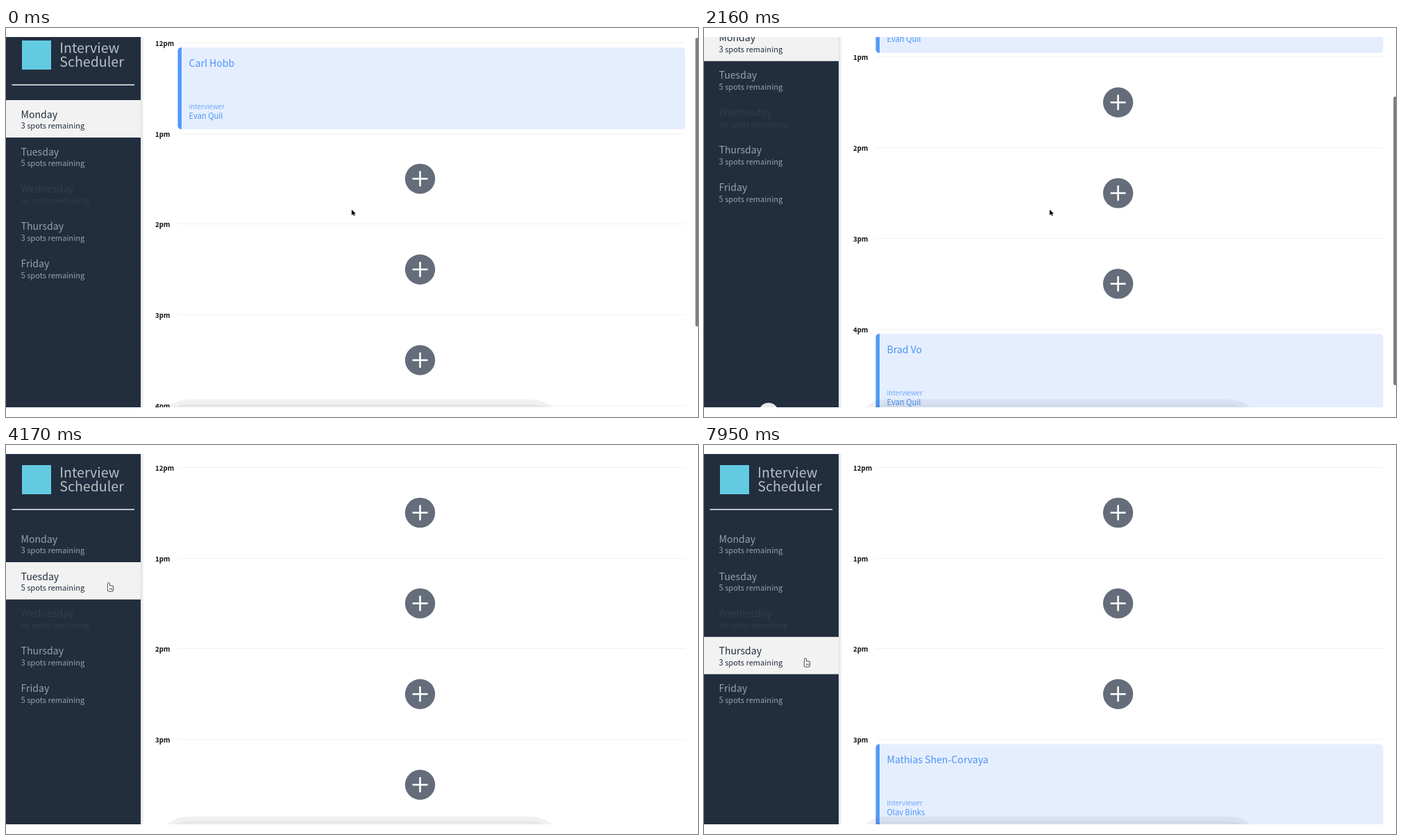
Recreate the animation shown at these times as an HTML page with a canvas. Size 997 by 561 pixels, loop 8000 ms.

```html
<!DOCTYPE html>
<html lang="en">
<head>
<meta charset="utf-8">
<title>Interview Scheduler</title>
<style>
  html, body { margin: 0; width: 100%; height: 100%; overflow: hidden; background: #fff; }
  canvas { display: block; }
</style>
</head>
<body>
<canvas id="stage" width="997" height="561"></canvas>
<script>
const ctx = document.getElementById('stage').getContext('2d');
const LOOP = 8000, STEP = 30;
const TOP = 13, BOTTOM = 547, HEIGHT = BOTTOM - TOP;
const SIDE = 194, DAY_TOP = 115, DAY_H = 53.9;
const HOUR_TOP = 32.2, HOUR_H = 130.8;
const CARD_X = 247.5, CARD_W = 731, CARD_H = 118;
const FAMILY = '"Noto Sans CJK JP", "Noto Sans CJK SC", "Noto Sans CJK", "Open Sans", sans-serif';
const NAVY = '#222e3e', BLUE = '#4c94f5';

const DAYS = [
  { name: 'Monday', spots: '3', slots: { 12: ['Carl Hobb', 'Evan Quil'], 4: ['Brad Vo', 'Evan Quil'] } },
  { name: 'Tuesday', spots: '5', slots: {} },
  { name: 'Wednesday', spots: 'no', full: true, slots: {
    12: ['Kurt Lo', 'Mirabel Tasen'],
    1: ['Ryle Shung', 'Rosalind Petrec'],
    2: ['Noam Barrinez', 'Helen Farnolds'],
    3: ['Nadia Hollar-Benks', 'Keri Dalholm'] } },
  { name: 'Thursday', spots: '3', slots: { 3: ['Mathias Shen-Corvaya', 'Olav Binks'] } },
  { name: 'Friday', spots: '5', slots: {} }
];

const clamp = u => Math.max(0, Math.min(1, u));

function ease(t, from, to) {
  const u = clamp((t - from) / (to - from));
  return u * u * (3 - 2 * u);
}

function box(x, y, w, h, color, radius = 0) {
  ctx.fillStyle = color;
  ctx.beginPath();
  ctx.roundRect(x, y, w, h, radius);
  ctx.fill();
}

function disc(x, y, r, color) {
  box(x - r, y - r, 2 * r, 2 * r, color, r);
}

function text(str, x, y, size, weight, color) {
  ctx.font = `${weight} ${size}px ${FAMILY}`;
  ctx.fillStyle = color;
  ctx.fillText(str, x, y);
}

function dayRow(day, y, on, hover) {
  let color = day.full ? '#323d4c' : '#98a1ac';
  if (on) {
    box(0, y, SIDE, DAY_H, day.full ? '#424c58' : '#f2f2f2');
    color = day.full ? '#28333f' : NAVY;
  } else if (hover) {
    box(0, y, SIDE, DAY_H, day.full ? '#2b3746' : '#3b4654');
  }
  text(day.name, 21.5, y + 25.6, 14.1, 400, color);
  text(`${day.spots} spots remaining`, 21.5, y + 41.2, 11.1, 300, color);
}

function sidebar(scroll, selected, hovered) {
  box(0, TOP, SIDE, HEIGHT, NAVY);
  const edge = ctx.createLinearGradient(SIDE, 0, SIDE + 5, 0);
  edge.addColorStop(0, '#dddfe1');
  edge.addColorStop(1, '#fff');
  box(SIDE, TOP, 5, HEIGHT, edge);

  ctx.save();
  ctx.translate(0, -scroll);
  box(23, 29, 42, 42, '#62cbe2');
  text('Interview', 77.3, 47, 19.6, 300, '#b9bfc6');
  text('Scheduler', 77.3, 66.6, 19.6, 300, '#b9bfc6');
  box(8.5, 92.3, 176.5, 1.5, '#f2f2f2');
  DAYS.forEach((day, i) => dayRow(day, DAY_TOP + DAY_H * i, i === selected, i === hovered));
  disc(93, 675.5, 14, '#e9e9e9');
  ctx.restore();
}

function card(y, [guest, host]) {
  box(CARD_X, y, CARD_W, CARD_H, '#e5eeff', 5);
  box(CARD_X, y, 5.5, CARD_H, '#5399fb', [5, 0, 0, 5]);
  text(guest, 263.5, y + 27.6, 14.1, 400, BLUE);
  text('Interviewer', 263.5, y + 88.8, 9.6, 300, '#6ca7f7');
  text(host, 263.5, y + 102.5, 11.2, 500, BLUE);
}

function addButton(x, y) {
  disc(x, y, 21.7, '#646d79');
  box(x - 11, y - 1.3, 22, 2.6, '#fff');
  box(x - 1.3, y - 11, 2.6, 22, '#fff');
}

function schedule(scroll, slots) {
  for (let i = 0; i <= 5; i++) {
    const hour = i || 12, y = HOUR_TOP + HOUR_H * i - scroll;
    box(CARD_X, Math.round(y - 0.5), CARD_W, 1, '#f1f1f1');
    text(`${hour}pm`, 215, y + 4.6, 9.7, 700, '#111');
    if (i === 5) break;
    if (slots[hour]) card(y + 6.8, slots[hour]);
    else addButton(596.6, y + HOUR_H / 2);
  }
}

// Soft rounded bar rising from the bottom edge
function hump(left, right, top, bend, alpha) {
  ctx.fillStyle = `rgba(0,0,0,${alpha})`;
  ctx.beginPath();
  ctx.moveTo(left, BOTTOM);
  ctx.quadraticCurveTo(left + bend * 0.35, top, left + bend, top);
  ctx.lineTo(right - bend, top);
  ctx.quadraticCurveTo(right - bend * 0.35, top, right, BOTTOM);
  ctx.fill();
}

function outlined(path, fill, stroke) {
  ctx.lineJoin = 'round';
  ctx.lineWidth = 1.4;
  ctx.strokeStyle = stroke;
  ctx.stroke(path);
  ctx.fillStyle = fill;
  ctx.fill(path);
}

const ARROW = new Path2D('M0 0V8L2 6.3L3.4 9L4.6 8.4L3.5 5.7H6Z');
const HAND = new Path2D();
HAND.roundRect(-3, -6, 2, 8, 1);
HAND.roundRect(-3.5, -1.8, 8, 7.5, 2.5);

function cursor(x, y, hand) {
  ctx.save();
  ctx.translate(x, y);
  if (hand) {
    outlined(HAND, '#fff', '#111');
    for (let i = 0; i < 3; i++) box(i * 1.7 - 0.8, 1, 0.7, 3, '#333');
  } else {
    outlined(ARROW, '#000', '#fff');
  }
  ctx.restore();
}

function draw(t) {
  const scroll = 11 + 152.5 * ease(t, 465, 1275) - 163.5 * ease(t, 1740, 3000);
  const reach = ease(t, 3120, 3960), settle = ease(t, 7860, 7950);
  const mx = 498 - 348 * reach - 2 * settle;
  const my = 262 - 57 * reach + 48 * ease(t, 4780, 5130) + 47 * ease(t, 6300, 6780) + 14 * settle;
  const selected = [4080, 5670, 7200].filter(click => click <= t).length;
  const hovered = mx < SIDE ? Math.floor((my + scroll - DAY_TOP) / DAY_H) : -1;

  box(0, 0, 997, 561, '#fff');
  ctx.save();
  ctx.beginPath();
  ctx.rect(0, TOP, 997, HEIGHT);
  ctx.clip();
  schedule(scroll, DAYS[selected].slots);
  sidebar(scroll, selected, hovered);
  hump(232, 787, 535.5, 36, 0.055);
  hump(243, 776, 542, 26, 0.03);
  ctx.globalAlpha = clamp((3650 - t) / 250);
  box(993.3, 5.7 + 0.771 * scroll, 5, 416 + 8.3 * (scroll < 11), '#7d7d7d', 2);
  ctx.globalAlpha = 1;
  cursor(mx, my, hovered >= 0);
  ctx.restore();
}

function tick() {
  const t = performance.now() % LOOP;
  draw(Math.floor(t / STEP) * STEP);
  requestAnimationFrame(tick);
}
tick();
</script>
</body>
</html>
```
